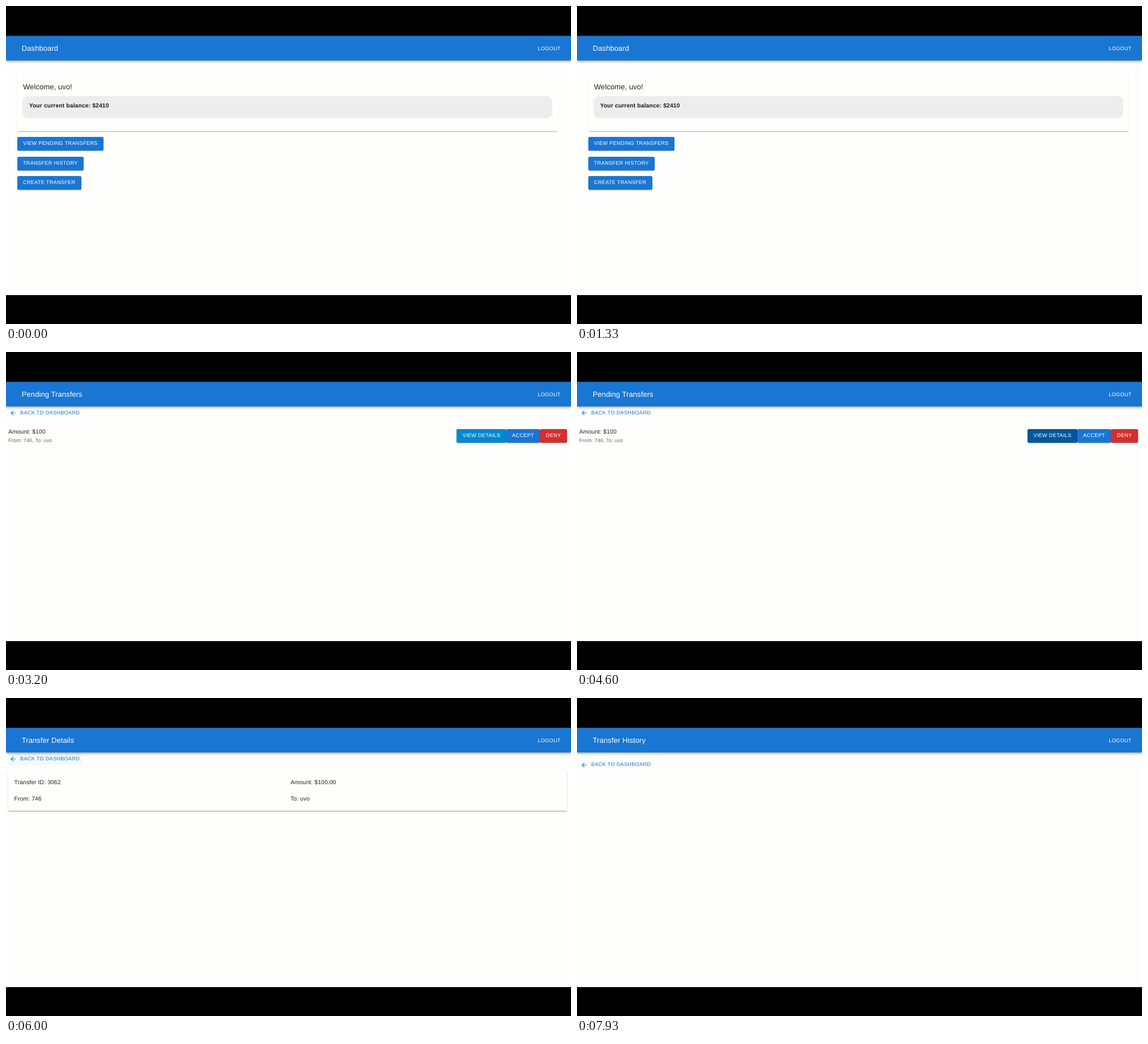
Recreate the animation shown at these times as an HTML page. Size 997 px wide and 561 px high, loop 8000 ms.

```html
<!DOCTYPE html>
<html lang="en">
<head>
<meta charset="utf-8">
<title>Transfers</title>
<style>
  html, body { margin: 0; width: 100%; height: 100%; overflow: hidden; background: #000; }
  body { position: relative; font: 10.39px "Liberation Sans", Arial, sans-serif; letter-spacing: .00938em;
    color: rgba(0, 0, 0, .87); text-rendering: geometricPrecision; }
  #app { position: absolute; left: 0; top: 52px; width: 997px; height: 458px; background: #fefefd; overflow: hidden; }
  #app > *, .page > * { position: absolute; }
  .page { inset: 0; }
  header { inset: 0 0 auto; height: 43.5px; border-top: 1px solid #16304a; box-sizing: border-box; background: #1976d2;
    box-shadow: 0 1.3px 2.6px -.65px #0003, 0 2.6px 3.2px #00000024, 0 .65px 6.5px #0000001f; }

  /* Labels are placed by their vertical centre. */
  .text { line-height: 20px; margin-top: -10px; white-space: pre; }
  .title { font-size: 12.98px; letter-spacing: .0075em; }
  .light { color: #fff; }
  .small { font-size: 9.09px; letter-spacing: .01071em; color: rgba(0, 0, 0, .6); }
  .caps, .button, .back { font-size: 9.2px; letter-spacing: .02857em; }

  .button { --h: 0%; padding: 0 10.4px; height: 23.7px; line-height: 23.7px; border-radius: 2.6px;
    margin-top: -11.85px; color: #fff; white-space: pre;
    background: color-mix(in srgb, var(--dark, #1565c0) var(--h), var(--base, #1976d2));
    box-shadow: 0 1.9px .65px -1.3px #0003, 0 1.3px 1.3px #00000024, 0 .65px 3.2px #0000001f; }
  .row { display: flex; right: 7.3px; }
  .info { --base: #0288d1; --dark: #01579b; }
  .deny { --base: #d32f2f; }

  .back { --h: 0%; left: 3.5px; width: 130px; height: 23.7px; line-height: 23.7px; margin-top: -11.85px;
    border-radius: 2.6px; color: #1976d2; text-indent: 21.5px; white-space: pre;
    background: color-mix(in srgb, rgba(25, 118, 210, .04) var(--h), transparent); }
  .back svg { position: absolute; left: 2.8px; top: 5.4px; width: 13px; height: 13px;
    fill: none; stroke: currentColor; stroke-width: 2; }
  .card { border-radius: 2.6px; box-sizing: border-box;
    box-shadow: 0 1.3px .65px -.65px #0003, 0 .65px .65px #00000024, 0 .65px 1.9px #0000001f; }
  .raised { box-shadow: 0 1.3px 1.3px -.65px #0004, 0 1px 1.3px #00000028, 0 .65px 3.2px #00000020; }
  .balance { border-radius: 10px; background: #ededed; }
</style>
</head>
<body>
<div id="app">
  <header></header>
  <div class="text title light" id="title" style="left:27.8px; top:23px"></div>
  <div class="text caps light" style="left:938.3px; top:22.6px">LOGOUT</div>

  <div class="page" id="dashboard">
    <div class="card" style="left:20px; top:69.5px; width:953.5px; height:99.5px"></div>
    <div class="text title" style="left:30px; top:91.3px">Welcome, uvo!</div>
    <div class="balance" style="left:28.5px; top:106.5px; width:935.5px; height:39.5px"></div>
    <div class="text" style="left:40.7px; top:124.7px; font-weight:bold">Your current balance: $2410</div>
    <div class="button" id="viewPending" style="left:19.6px; top:191.2px">VIEW PENDING TRANSFERS</div>
    <div class="button" id="viewHistory" style="left:19.6px; top:225.8px">TRANSFER HISTORY</div>
    <div class="button" style="left:19.6px; top:260.2px">CREATE TRANSFER</div>
  </div>

  <div class="page" id="pending">
    <div class="back" style="top:55.6px"></div>
    <div class="text" style="left:4px; top:90px">Amount: $100</div>
    <div class="text small" style="left:4px; top:104px">From: 746, To: uvo</div>
    <div class="row" style="top:96.3px">
      <div class="button info" id="viewDetails">VIEW DETAILS</div>
      <div class="button">ACCEPT</div>
      <div class="button deny">DENY</div>
    </div>
  </div>

  <div class="page" id="details">
    <div class="back" id="backLink" style="top:55.6px"></div>
    <div class="card raised" style="left:4px; top:77px; width:986px; height:69.5px"></div>
    <div class="text" style="left:14.6px; top:97.7px">Transfer ID: 3062</div>
    <div class="text" style="left:502px; top:97.7px">Amount: $100.00</div>
    <div class="text" style="left:14.6px; top:126.6px">From: 746</div>
    <div class="text" style="left:502px; top:126.6px">To: uvo</div>
  </div>

  <div class="page" id="history">
    <div class="back" style="top:66.2px"></div>
  </div>
</div>

<script>
  const LOOP = 8000, FADE = 250;
  const byId = id => document.getElementById(id);

  const titles = {
    dashboard: "Dashboard",
    pending: "Pending Transfers",
    details: "Transfer Details",
    history: "Transfer History"
  };
  const visits = [
    [0, "dashboard"], [2930, "pending"], [4870, "details"], [6070, "dashboard"], [7330, "history"]
  ];
  // Time at which the pointer enters and leaves each control.
  const hovers = {
    viewPending: [2250, 2930],
    viewDetails: [4150, 4870],
    backLink: [5650, 6070],
    viewHistory: [6400, 7330]
  };

  for (const link of document.querySelectorAll(".back")) {
    link.innerHTML = '<svg viewBox="0 0 24 24"><path d="M20 12H6M12.7 4.7 5.4 12l7.3 7.3"/></svg>BACK TO DASHBOARD';
  }

  function ease(p) {
    p = Math.min(1, Math.max(0, p));
    return p * p * (3 - 2 * p);
  }

  function draw(now) {
    const t = now % LOOP;
    const current = visits.findLast(([start]) => t >= start)[1];
    byId("title").textContent = titles[current];
    for (const page in titles) byId(page).style.display = page === current ? "block" : "none";
    for (const [id, [enter, leave]] of Object.entries(hovers)) {
      const amount = t < leave ? ease((t - enter) / FADE) : 0;
      byId(id).style.setProperty("--h", amount * 100 + "%");
    }
    requestAnimationFrame(draw);
  }
  draw(0);
</script>
</body>
</html>
```
